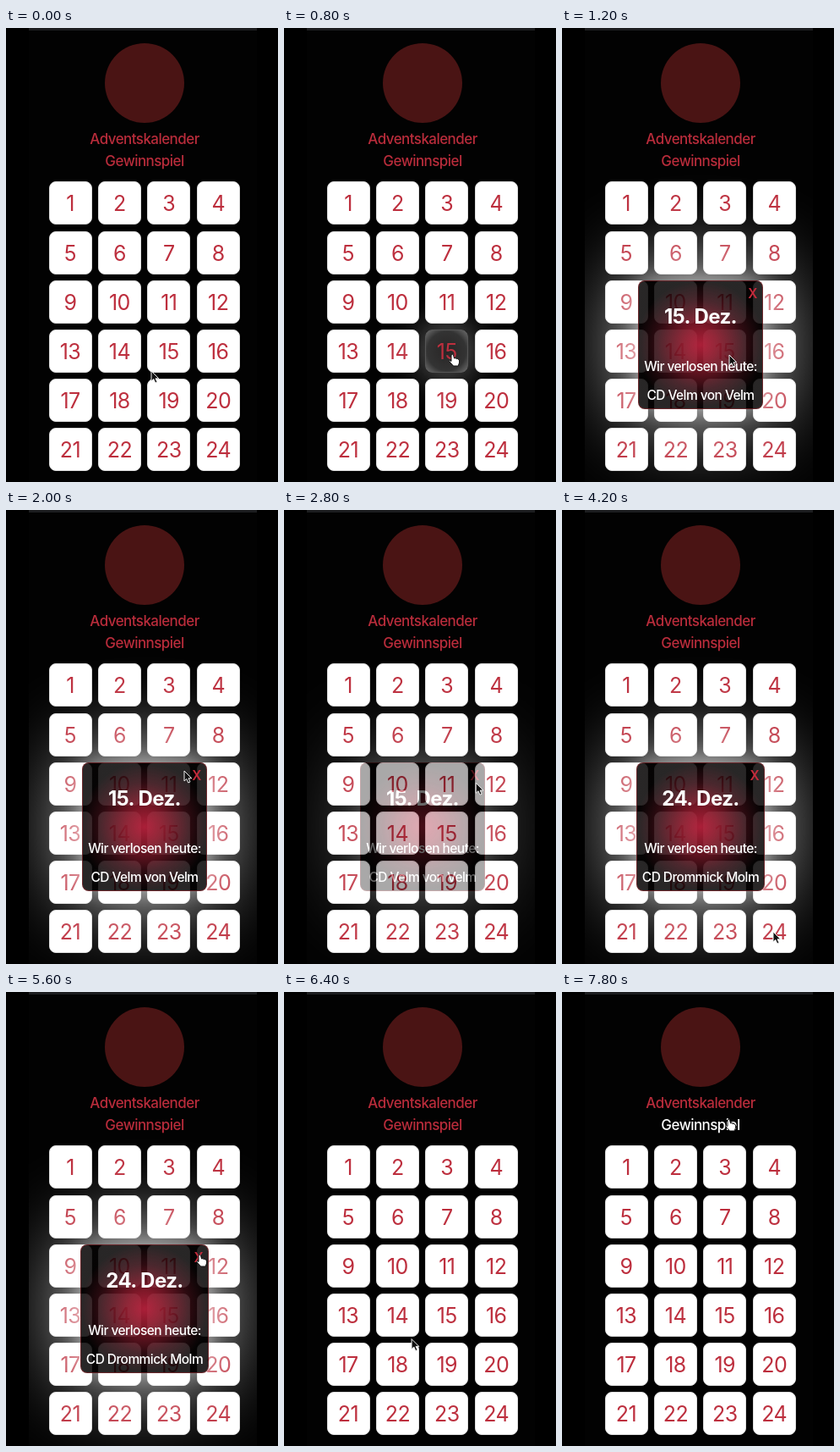
Recreate the animation shown at these times as an HTML page. Size 322 px wide and 536 px high, loop 8 s.

```html
<!DOCTYPE html>
<html lang="de">
<head>
<meta charset="utf-8">
<title>Adventskalender</title>
<style>
html, body { margin: 0; width: 100%; height: 100%; overflow: hidden; background: #000; }
body { position: relative; font-family: Inter, sans-serif; letter-spacing: -.035em; }
#page { position: absolute; left: 27px; top: 0; width: 270px; height: 536px; overflow: hidden; isolation: isolate;
  background: #020202; border-top: 3px solid #1c1d1f; box-sizing: border-box; }
#page > * { position: absolute; }
#logo { left: 90px; top: 15px; width: 94px; height: 94px; border-radius: 50%; background: #4a1414; }
.head { left: 0; width: 274px; text-align: center; font: 500 17px/26px Inter, sans-serif; color: #b92c3b; }
.tile { width: 51px; height: 51px; box-sizing: border-box; border: 1px solid #ddd; border-radius: 8px;
  background: #fff; color: #bd2f3e; font-size: 25px; line-height: 50px; text-align: center; }
.tile.lit { z-index: 1; border-color: #555; box-shadow: 0 0 45px 2px #fff7;
  background: radial-gradient(circle, #282626 0, #333 23px, #484848 27px, #777 36px); }
#pop { left: 0; right: 0; top: 294.5px; z-index: 2; width: fit-content; height: 152px; margin: 0 auto;
  padding: 0 6px; transform: translateX(2px); box-sizing: border-box; border: 1px solid #8c2a30b0;
  border-radius: 8px; color: #fff; text-align: center; font: 500 15.5px/34px Inter, sans-serif;
  background: radial-gradient(circle at 50% 50%, #b0203af8 0, #8a1a2cf0 20px, #340c13e2 52px, #060404dc 76px);
  box-shadow: 0 0 110px 5px #fff, 0 0 24px #fff6; white-space: nowrap; }
#pop b { display: block; font: 700 24px/84px Inter, sans-serif; }
#pop i { position: absolute; right: 6px; top: -2px; color: #c62b3c; font-style: normal; font-weight: 600; }
#cursor { position: absolute; left: 0; top: 0; width: 18px; height: 20px; overflow: visible; }
#cursor path { stroke-width: 1; stroke-linejoin: round; }
</style>
</head>
<body>
<div id="page">
  <div id="logo"></div>
  <div class="head" style="top:115px">Adventskalender</div>
  <div class="head" id="game" style="top:141px">Gewinnspiel</div>
  <div id="pop"><i>X</i><b id="day"></b><div>Wir verlosen heute:</div><div id="prize"></div></div>
</div>
<svg id="cursor">
  <path id="arrow" fill="#111" stroke="#eee" d="M0 0V12L2.8 9.5 4.8 14 7 13 5 8.8H8.8Z"/>
  <path id="hand" fill="#fff" stroke="#111" d="M0 0Q1.5-1.5 2.5 0L3.5 4 5 3.6 6.3 4.6 7.6 4.4 8.6 5.6 9.6 6V9L8.2 13H2.6L-2.4 7.6Q-2.2 6 0 7.4Z"/>
</svg>
<script>
const LOOP = 8000, STEP = 200;
const $ = id => document.getElementById(id);

// time, tip x, tip y
const path = [
  [0, 172, 405], [200, 172, 405], [600, 198, 386], [1500, 198, 386],
  [2000, 211, 308], [2300, 226, 312], [2700, 226, 312], [3400, 247, 497],
  [4100, 250, 498], [4600, 250, 498], [5300, 228, 311], [5900, 228, 311],
  [6600, 132, 434], [6800, 132, 434], [7000, 133, 435], [7200, 133, 435],
  [7800, 196, 151], [8000, 196, 151]
];
const draws = [
  { day: 15, prize: 'CD Velm von Velm', press: 800, open: 1000, close: 2800 },
  { day: 24, prize: 'CD Drommick Molm', press: 3600, open: 3800, close: 5800 }
];

const tiles = Array.from({ length: 24 }, (_, i) => {
  const el = document.createElement('div');
  el.className = 'tile';
  el.textContent = i + 1;
  el.style.left = 23.5 + i % 4 * 58.4 + 'px';
  el.style.top = 178.4 + Math.floor(i / 4) * 58.2 + 'px';
  return $('page').appendChild(el);
});

function cursorAt(t) {
  const i = path.findIndex((p, n) => n && t <= p[0]);
  const [t0, x0, y0] = path[i - 1], [t1, x1, y1] = path[i];
  const k = (t - t0) / (t1 - t0), s = k * k * (3 - 2 * k);
  return [x0 + (x1 - x0) * s, y0 + (y1 - y0) * s];
}

function overTile(x, y) {
  const u = (x - 51) % 58.4, v = (y - 182) % 58.2;
  return x > 51 && x < 277 && y > 182 && u > 3 && u < 48 && v > 3 && v < 48;
}

function render(t) {
  const draw = draws.find(d => t >= d.press && t <= d.close);
  const open = draw && t >= draw.open;
  tiles.forEach((el, i) => el.classList.toggle('lit', !!draw && !open && draw.day === i + 1));

  $('pop').style.display = open ? '' : 'none';
  if (open) {
    $('day').textContent = draw.day + '. Dez.';
    $('prize').textContent = draw.prize;
    $('pop').style.opacity = t === draw.open ? .6 : t === draw.close ? .4 : 1;
  }

  const [x, y] = cursorAt(t);
  const onGame = x > 117 && x < 211 && y > 146 && y < 168;
  const pointing = open ? x > 220 && y < 322 : onGame || overTile(x, y);
  $('game').style.color = onGame ? '#fff' : '';
  $('arrow').style.display = pointing ? 'none' : '';
  $('hand').style.display = pointing ? '' : 'none';
  $('cursor').style.transform = `translate(${x}px, ${y}px)`;
}

function tick() {
  render(Math.floor(performance.now() % LOOP / STEP) * STEP);
  requestAnimationFrame(tick);
}
tick();
</script>
</body>
</html>
```
